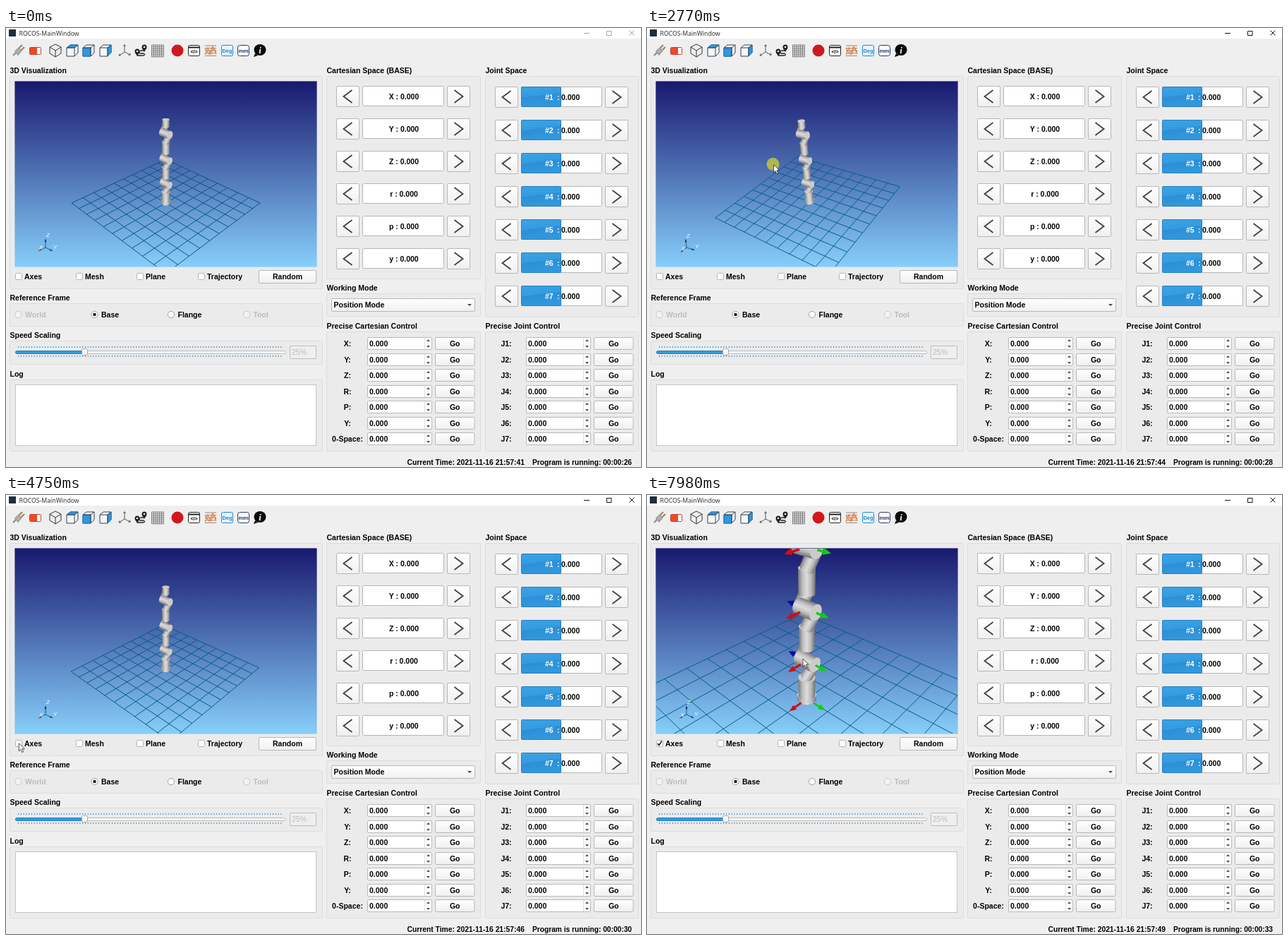
Write an HTML page with a canvas that moves like this. It is 900 px wide and 622 px high and loops after 8 s.

```html
<!DOCTYPE html>
<html lang="en">
<head>
<meta charset="utf-8">
<title>ROCOS-MainWindow</title>
<style>
html, body { margin: 0; width: 100%; height: 100%; overflow: hidden; background: #efefef; }
#stage { position: relative; width: 900px; height: 622px; overflow: hidden; }
#stage > * { position: absolute; left: 0; top: 0; }
#stage > #view { left: 13px; top: 76px; }
text { font: bold 10.5px "Liberation Sans", Arial, sans-serif; fill: #000; white-space: pre; }
</style>
</head>
<body>
<div id="stage">
  <svg id="ui" width="900" height="622"></svg>
  <canvas id="view" width="427" height="262"></canvas>
  <svg width="900" height="622">
    <g id="pointer">
      <circle id="press" cx="-1" cy="-1" r="9" fill="#d6d62c" fill-opacity=".72"/>
      <path d="M0 0v11.2l2.6-2.4 1.9 4.1 1.9-.9-1.9-4h3.6z" fill="#fff" stroke="#222" stroke-width=".8"/>
    </g>
  </svg>
</div>
<script>
const $ = id => document.getElementById(id);

// ---------- window widgets ----------
let svg = `<defs>
  <linearGradient id="btn" x2="0" y2="1"><stop stop-color="#fff"/><stop offset="1" stop-color="#f0f0f0"/></linearGradient>
  <linearGradient id="sky" x2="0" y2="1"><stop stop-color="#191970"/><stop offset="1" stop-color="#87cefa"/></linearGradient>
  <linearGradient id="blue" x2=".25" y2="1"><stop stop-color="#3ba3e4"/><stop offset=".5" stop-color="#349be0"/><stop offset=".52" stop-color="#2d8fd6"/><stop offset="1" stop-color="#3198dd"/></linearGradient>
</defs>`;
const add = s => { svg += s; };
const box = (x, y, w, h, fill = '#fff', stroke = '#b9b9b9', r = 1.5) =>
  add(`<rect x="${x + .5}" y="${y + .5}" width="${w}" height="${h}" rx="${r}" fill="${fill}" stroke="${stroke}"/>`);
const text = (x, y, s, attrs = '') => add(`<text x="${x}" y="${y}" ${attrs}>${s}</text>`);
const line = (d, color = '#444', w = 1, fill = 'none') =>
  add(`<path d="${d}" fill="${fill}" stroke="${color}" stroke-width="${w}"/>`);
const mid = 'text-anchor="middle"';
const group = (title, x, y, w, h) => {
  text(x + .5, y - 4.5, title);
  box(x, y, w, h, '#ebebeb', '#dcdcdc', 2);
};
const button = (x, y, w, h, label) => {
  box(x, y, w, h, 'url(#btn)', '#b7b7b7');
  if (label) text(x + w / 2 + .5, y + h / 2 + 4.3, label, mid);
};
const chevron = (x, y, dir) => {
  button(x, y - 15, 32, 29);
  line(`M${x + 16.5 - dir * 6} ${y - 9}l${dir * 12} 9l${-dir * 12} 9`, '#454545', 1.9);
};

add('<rect width="900" height="622" fill="#efefef"/><rect width="900" height="15" fill="#fff"/>');
add('<rect x="4" y="2" width="10" height="10" fill="#1f3038"/>');
text(18.5, 10.5, 'ROCOS-MainWindow', 'style="font:8.700px \'Noto Sans\',sans-serif;fill:#333"');
add('<path id="winbtns" d="M819 7.5h8M851.5 4.5h6.500v6h-6.500zM883.500 3.500l7 7m0-7l-7 7" fill="none"/>');

// toolbar
line('M10 39l4-4', '#8e8e8e', 2.4);
line('M13 33l5-5 4 4-5 6z', '#9a9a9a', 1.5, '#b5b0a8');
line('M19 28l4-4M22 31l4-4', '#a08a68', 2.4);
box(33, 27, 16, 10, '#fff', '#bb4434', 1);
add('<rect x="34" y="28" width="10" height="9" fill="#f04a24"/>');
const cube = (x, face) => {
  line(`M${x - 8} 28l5-4h11v11l-5 5h-11z`, '#33414b', 1, '#f7f7f7');
  const faces = { top: `M${x - 8} 28l5-4h11l-5 4z`, front: `M${x - 8} 28h11v12h-11z`, side: `M${x + 3} 28l5-4v11l-5 5z` };
  line(faces[face], '#2376b4', 1, '#2e97df');
  line(`M${x - 8} 28h11v12m0-12l5-4`, '#33414b', 1);
};
line('M70 23l8 4v9l-8 5-8-5v-9zM62 27l8 5 8-5M70 32v9', '#333', 1);
cube(94, 'top'); cube(117, 'front'); cube(141, 'side');
line('M168 24v10l-8 5M168 34l8 4M166.500 26l1.500-2.500 1.500 2.500M161 36.500l-1 2.500h3M175 35.500l1.500 2.500-3 .5', '#555', 1);
line('M186 39h9q3-1 0-3h-5q-3-2 1-4h4', '#222', 1.3);
add('<circle cx="186" cy="33" r="3.500" fill="#222"/><circle cx="186" cy="33" r="1.300" fill="#fff"/><path d="M183 35h6l-3 5z" fill="#222"/><circle cx="196" cy="27" r="3.500" fill="#222"/><circle cx="196" cy="27" r="1.300" fill="#fff"/><path d="M193 29h6l-3 5z" fill="#222"/>');
for (let i = 0; i < 7; i++) line(`M${206.5 + i * 2.8} 24v17M206.500 ${24 + i * 2.8}h17`, '#666', .8);
add('<circle cx="243" cy="32" r="8.500" fill="#d0181e"/>');
box(258, 24, 16, 15, '#fff', '#222', 2);
line('M258 27.500h17', '#222', 2);
text(266.5, 36, '&lt;/&gt;', mid + ' style="font-size:7px"');
for (let i = 0; i < 5; i++) line(`M282 ${25 + i * 3.6}h16`, '#8c7a70', .9);
line('M282 38l4-10 4 9 4-9 4 9M282 29l6 8 5-11 5 8', '#e8843c', 1.2);
box(305, 24, 16, 15, '#e9f5ff', '#1687d9', 2);
text(313.5, 35, 'Deg', mid + ' style="font-size:7.500px;fill:#1687d9"');
box(328, 24, 16, 15, '#fff', '#27346f', 3);
text(336.5, 34.5, 'mm', mid + ' style="font-size:8px;fill:#27346f"');
add('<ellipse cx="360" cy="31" rx="8.500" ry="8" fill="#080808"/><path d="M353 36l-2 5 6-2z" fill="#080808"/>');
text(360, 36, 'i', mid + ' style="font:italic bold 13px \'Liberation Serif\',serif;fill:#fff"');

// left column
group('3D Visualization', 5, 68, 443, 301);
add('<rect x="12.400" y="75.400" width="428.200" height="263.200" fill="url(#sky)"/>');
['Axes', 'Mesh', 'Plane', 'Trajectory'].forEach((s, i) => {
  const x = [13, 99, 185, 272][i];
  box(x, 347, 9, 9, '#fff', '#b5b5b5', 1);
  text(x + 13, 356, s);
});
add('<path id="tick" d="M15 352l2 2.500 4-6" fill="none" stroke="#111" stroke-width="1.400"/>');
button(358, 343, 81, 18, 'Random');
group('Reference Frame', 5, 390, 443, 32);
['World', 'Base', 'Flange', 'Tool'].forEach((s, i) => {
  const x = [17.5, 125.5, 234, 341][i], off = i % 3 === 0;
  add(`<circle cx="${x}" cy="406" r="4.700" fill="${off ? '#f2f2f2' : '#fff'}" stroke="${off ? '#c8c8c8' : '#a0a0a0'}"/>`);
  if (i === 1) add(`<circle cx="${x}" cy="406" r="2.300" fill="#222"/>`);
  text(x + 9.5, 409.5, s, off ? 'style="fill:#bcbcbc"' : '');
});
group('Speed Scaling', 5, 443, 443, 33);
for (const y of [452, 465]) add(`<path d="M17 ${y}H392" stroke="#3b87b8" stroke-width="2" stroke-dasharray="1 2.800"/>`);
box(13, 457, 383, 4, '#f7f7f7', '#bcbcbc', 2);
box(13, 457, 97, 4, '#309ae0', '#2b82bd', 2);
box(107, 454, 8, 9, 'url(#btn)', '#a9a9a9', 2);
box(402, 450, 37, 18, '#efefef', '#bdbdbd');
text(405, 463, '25%', 'style="fill:#bcbcbc;font-weight:normal"');
group('Log', 5, 498, 443, 101);
box(13, 505, 426, 86, '#fff', '#c4c4c4', 0);

// jog panels
group('Cartesian Space (BASE)', 454, 68, 218, 287);
[...'XYZrpy'].forEach((axis, i) => {
  const y = 97 + 46 * i;
  chevron(468, y, -1);
  box(505, y - 15, 115, 28, '#fff', '#b5b5b5', 2);
  text(564, y + 3.5, axis + ' : 0.000', mid);
  chevron(625, y, 1);
});
group('Working Mode', 454, 376, 218, 32);
button(461, 383, 203, 18);
text(464.5, 396, 'Position Mode');
add('<path d="M654 391h6l-3 3z" fill="#444"/>');
group('Joint Space', 679, 68, 217, 341);
for (let i = 0; i < 7; i++) {
  const y = Math.round(97.5 + 47.1 * i);
  chevron(693, y, -1);
  box(730, y - 15, 114, 28, '#fff', '#b5b5b5', 2);
  box(730, y - 15, 56, 28, 'url(#blue)', '#2a7fbd', 1);
  text(764, y + 3.5, `#${i + 1}`, 'style="fill:#fff"');
  text(781, y + 3.5, ':', 'style="fill:#fff"');
  text(787, y + 3.5, '0.000');
  chevron(849, y, 1);
}
const precise = (title, x, w, names) => {
  group(title, x, 430, w, 169);
  names.forEach((s, i) => {
    const y = Math.round(447 + 22.55 * i);
    text(x + 30, y + 3.5, s, mid);
    box(x + 58, y - 9, 91, 17, '#fff', '#b9b9b9');
    line(`M${x + 139.5} ${y - 8}v16`, '#ddd');
    add(`<path d="M${x + 142} ${y - 3}h5l-2.500-3zM${x + 142} ${y + 3}h5l-2.500 3z" fill="#555"/>`);
    text(x + 61, y + 3.5, '0.000');
    button(x + 154, y - 9, 55.5, 17, 'Go');
  });
};
precise('Precise Cartesian Control', 454, 218, ['X:', 'Y:', 'Z:', 'R:', 'P:', 'Y:', '0-Space:']);
precise('Precise Joint Control', 679, 217, [1, 2, 3, 4, 5, 6, 7].map(n => `J${n}:`));
text(568.5, 618.5, '', 'id="clock" style="font-size:10.300px"');
text(746, 618.5, '', 'id="uptime" style="font-size:10.200px"');
$('ui').innerHTML = svg;

// ---------- 3D view ----------
const g = $('view').getContext('2d'), FOCAL = 489, RAD = Math.PI / 180;
let cam;

function orient(x, y, z) {
  const a = (y - x) * Math.SQRT1_2, b = -(x + y) * Math.SQRT1_2;
  const { cp, sp, ce, se, cr, sr } = cam;
  const right = a * cp - b * sp, away = a * sp + b * cp;
  const down = -(z * ce + away * se);
  return [right * cr - down * sr, right * sr + down * cr, away * ce - z * se];
}
function project([x, y, z]) {
  const [u, v, w] = orient(x, y, z - .5), k = FOCAL / (cam.d + w);
  return { x: 213.5 + u * k, y: 131 + v * k, k };
}
function stroke(p, q, color, w) {
  g.strokeStyle = color; g.lineWidth = w;
  g.beginPath(); g.moveTo(p.x, p.y); g.lineTo(q.x, q.y); g.stroke();
}
function arrowHead(p, q, from, half, color) {
  const m = { x: p.x + (q.x - p.x) * from, y: p.y + (q.y - p.y) * from };
  const a = Math.atan2(q.y - p.y, q.x - p.x), nx = -Math.sin(a) * half, ny = Math.cos(a) * half;
  g.fillStyle = color;
  g.beginPath(); g.moveTo(q.x, q.y); g.lineTo(m.x + nx, m.y + ny); g.lineTo(m.x - nx, m.y - ny); g.fill();
}
function tube(a, b, r) {
  const p = project(a), q = project(b);
  const dx = q.x - p.x, dy = q.y - p.y, len = Math.hypot(dx, dy) || 1, angle = Math.atan2(dy, dx);
  const k = (p.k + q.k) / 2, full = Math.hypot(b[0] - a[0], b[1] - a[1], b[2] - a[2]);
  const squash = Math.sqrt(Math.max(0, 1 - (len / k / full) ** 2));
  const nx = -dy / len, ny = dx / len, rp = r * p.k, rq = r * q.k;
  const shade = g.createLinearGradient(p.x - nx * rp, p.y - ny * rp, p.x + nx * rp, p.y + ny * rp);
  [[0, '#7c7c7c'], [.25, '#c0c0c0'], [.5, '#dcdcdc'], [.75, '#bababa'], [1, '#747474']].forEach(s => shade.addColorStop(...s));
  g.fillStyle = shade;
  const cap = (c, rc) => { g.beginPath(); g.ellipse(c.x, c.y, rc * squash, rc, angle, 0, 7); g.fill(); };
  cap(p, rp); cap(q, rq);
  g.beginPath();
  g.moveTo(p.x + nx * rp, p.y + ny * rp); g.lineTo(q.x + nx * rq, q.y + ny * rq);
  g.lineTo(q.x - nx * rq, q.y - ny * rq); g.lineTo(p.x - nx * rp, p.y - ny * rp);
  g.fill();
  g.fillStyle = '#cbcbcb';
  q.k > p.k ? cap(q, rq) : cap(p, rp);
}

const JOINTS = [.3415, .7355, 1.128], TIP = 1.35, AXIS = .18;
function robot() {
  tube([0, 0, 0], [0, 0, .04], .07);
  tube([0, 0, .03], [0, 0, .2], .061);
  JOINTS.forEach((z, i) => {
    tube([0, -.06, z], [0, 0, z + .12], .045);
    tube([0, 0, z - .13], [0, .06, z - .01], .045);
    tube([0, -.075, z], [0, .075, z], .055);
    tube([0, 0, z + .1], [0, 0, i < 2 ? z + .27 : TIP - .025], i < 2 ? .052 : .047);
  });
}
function axis(z, dir, start, color) {
  const at = s => project([dir[0] * s, dir[1] * s, z + dir[2] * s]);
  const p = at(start), neck = at(AXIS * .75), q = at(AXIS);
  stroke(p, neck, color, p.k * .015);
  arrowHead(project([0, 0, z]), q, .68, p.k * .02, color);
}
function triad() {
  const o = { x: 43, y: 235 };
  [['X', 1, 0, 0, '#b33'], ['Y', 0, 1, 0, '#164f3c'], ['Z', 0, 0, 1, '#14306e']].forEach(([s, x, y, z, color]) => {
    const [u, v] = orient(x, y, z), q = { x: o.x + u * 14, y: o.y + v * 14 };
    stroke(o, q, '#0f6088', 1);
    arrowHead(o, q, .66, 1.5, color);
    g.fillStyle = '#fff';
    g.fillText(s, q.x + 3.5, q.y - 2.5);
  });
}
function drawView(showAxes) {
  const sky = g.createLinearGradient(0, 0, 0, 262);
  sky.addColorStop(0, '#191970'); sky.addColorStop(1, '#87cefa');
  g.fillStyle = sky; g.fillRect(0, 0, 427, 262);
  const lit = Math.abs(cam.se), grid = `rgb(0,${180 * lit},${255 * lit})`;
  for (let i = -5; i <= 5; i++) {
    const c = i / 5;
    stroke(project([c, -1, 0]), project([c, 1, 0]), grid, 1);
    stroke(project([-1, c, 0]), project([1, c, 0]), grid, 1);
  }
  if (showAxes) {
    JOINTS.forEach(z => axis(z, [0, -1, 0], 0, '#0a0aa8'));
    axis(TIP, [0, 0, 1], 0, '#0a0ac0');
  }
  robot();
  if (showAxes) [0, ...JOINTS, TIP].forEach(z => {
    axis(z, [1, 0, 0], .06, '#d40c0c');
    axis(z, [0, 1, 0], .08, '#0bd00b');
  });
  g.font = 'italic 8px "Liberation Sans", Arial, sans-serif';
  g.textAlign = 'center';
  triad();
}

// ---------- timeline ----------
const LOOP = 8000, PRESS = 1270, RELEASE = 4400, CHECK = 4850;
const NOTCHES = [7260, 7440, 7780, 7920];
// time, azimuth, elevation, roll
const CAMERA = [[PRESS, 0, 30, 0], [1620, 13.4, 54, 8.8], [2050, 4, 8, -12], [2290, 0, 26, -22.4],
  [3300, 12.6, 40.3, 12.9], [4050, 2.3, 35.5, 0], [RELEASE, 2, 31, 0]];
// time, x, y
const POINTER = [[390, 520, 640], [1130, 226, 254], [PRESS, 206, 214], [1620, 218, 240], [2050, 203, 97],
  [2290, 180, 178], [3300, 179, 212], [4050, 173, 212], [RELEASE, 173, 208], [4760, 18, 352],
  [4920, 18, 352], [5300, 93, 348], [5650, 97, 350], [6400, 99, 350], [7100, 221, 232]];

function sample(keys, t) {
  const i = keys.findIndex(k => k[0] > t);
  if (i === 0) return keys[0].slice(1);
  if (i < 0) return keys[keys.length - 1].slice(1);
  const a = keys[i - 1], b = keys[i], s = (t - a[0]) / (b[0] - a[0]), e = s * s * (3 - 2 * s);
  return a.slice(1).map((v, j) => v + (b[j + 1] - v) * e);
}
const ticks = (t, first, period) => Math.max(0, Math.floor((t - first) / period) + 1);

function draw(now) {
  const t = now % LOOP;
  const [az, el, roll] = sample(CAMERA, t).map(v => v * RAD);
  cam = { cp: Math.cos(az), sp: Math.sin(az), ce: Math.cos(el), se: Math.sin(el), cr: Math.cos(roll), sr: Math.sin(roll),
    d: 4.93 / 1.21 ** NOTCHES.filter(n => n <= t).length };
  drawView(t >= CHECK);
  $('pointer').setAttribute('transform', `translate(${sample(POINTER, t)})`);
  $('press').setAttribute('visibility', t >= PRESS && t < RELEASE ? 'visible' : 'hidden');
  $('tick').setAttribute('visibility', t >= CHECK ? 'visible' : 'hidden');
  $('winbtns').setAttribute('stroke', t >= PRESS ? '#111' : '#a5a5a5');
  $('clock').textContent = `Current Time: 2021-11-16 21:57:${41 + ticks(t, 415, 1046)}`;
  $('uptime').textContent = `Program is running: 00:00:${26 + ticks(t, 880, 1056)}`;
}
const start = performance.now();
(function frame() {
  draw(performance.now() - start);
  requestAnimationFrame(frame);
})();
</script>
</body>
</html>
```
